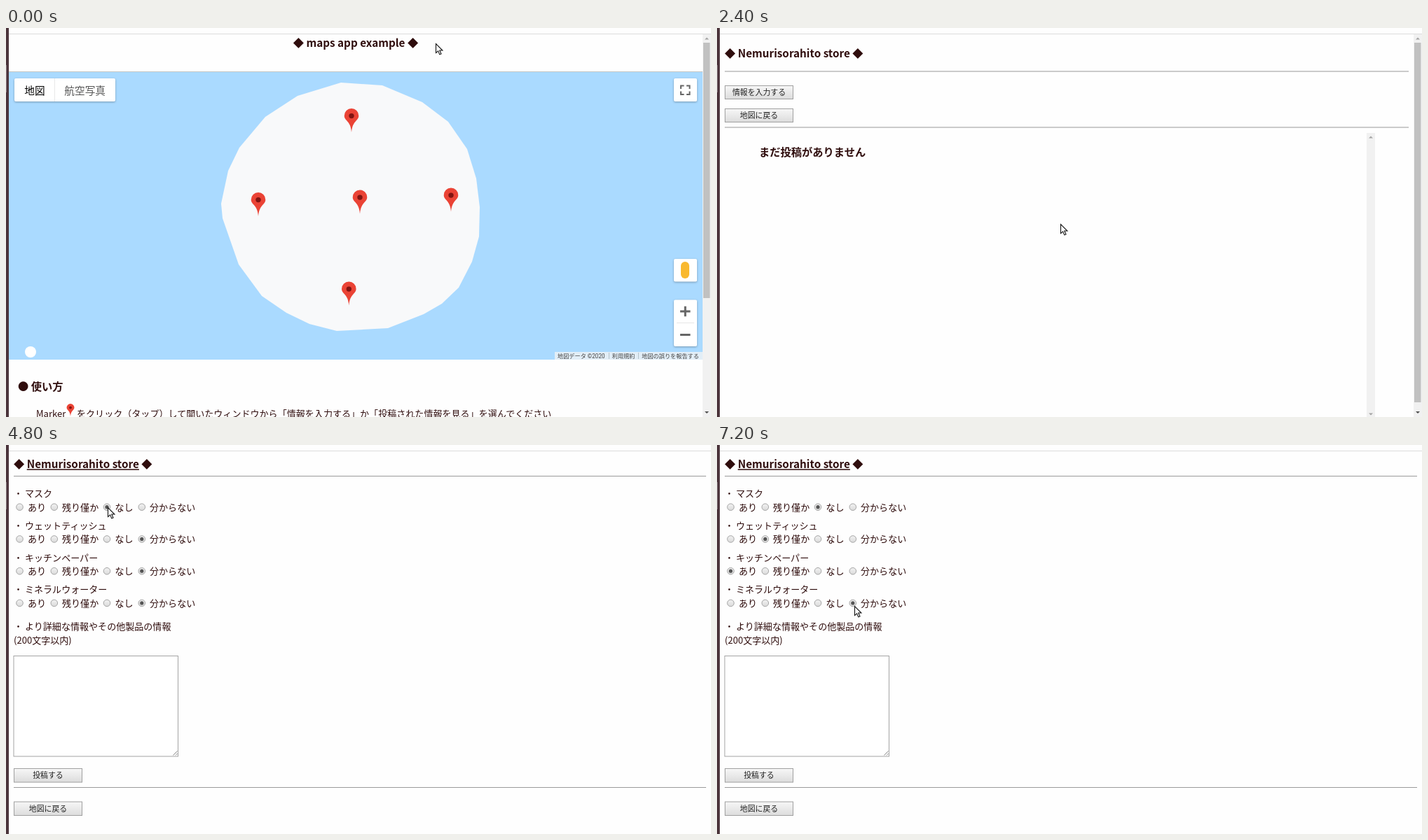
These frames come from a looping animation (1006 by 556 pixels, 8000 ms). An HTML page:

```html
<!DOCTYPE html>
<html lang="ja">
<head>
<meta charset="utf-8">
<title>maps app example</title>
<style>
  html, body { margin: 0; width: 100%; height: 100%; overflow: hidden; background: #fefefe; }
  svg { display: block; width: 1006px; height: 556px; }
  text { font: 13.05px "Noto Sans CJK JP", "Noto Sans CJK", sans-serif; fill: #2f0d0d; white-space: pre; }
  .h { font-size: 15.27px; font-weight: 700; }
  .u { text-decoration: underline; }
  .mid { text-anchor: middle; }
  .btn { font-size: 10.88px; fill: #222; }
  .arial { font-family: "Liberation Sans", Arial, sans-serif; }
  .ui { font-size: 14.68px; fill: #565656; }
  .on { font-weight: 500; fill: #000; }
  .info { font: 300 10.6px Roboto, "Noto Sans CJK JP", sans-serif; fill: #333; }
  .name { font-weight: 700; fill: #111; }
  .legal { font: 8.16px Roboto, "Noto Sans CJK JP", sans-serif; fill: #444; }
  .tip { font: 12px "Open Sans", "Noto Sans", sans-serif; fill: #fff; }
  .card { filter: drop-shadow(0 1px 1.5px rgba(0,0,0,.3)); }
  .pop { filter: drop-shadow(0 2px 4px rgba(0,0,0,.42)); }
</style>
</head>
<body>
<svg id="stage" viewBox="0 0 1006 556">
  <defs>
    <linearGradient id="face" x2="0" y2="1">
      <stop stop-color="#f7f7f7"/><stop offset="1" stop-color="#dcdcdc"/>
    </linearGradient>
    <linearGradient id="knob" x2="0" y2="1">
      <stop stop-color="#f2f2f2"/><stop offset="1" stop-color="#dadada"/>
    </linearGradient>
    <clipPath id="mapClip"><rect x="4" y="63" width="990" height="411"/></clipPath>
    <g id="pin">
      <path d="M0 0C-.8-9-3.2-12.5-6.4-16.2C-8.8-19-10.3-20.8-10.3-23.6A10.3 10.3 0 0 1 10.3-23.6C10.3-20.8 8.8-19 6.4-16.2C3.2-12.5.8-9 0 0Z" fill="#ea4335"/>
      <circle cy="-23.4" r="3.7" fill="#811411"/>
    </g>
    <path id="arrow" d="M.5.5V13.6L3.6 10.8L5.8 15.9L8 15L5.8 10H9.9Z" fill="#fff" stroke="#111" stroke-width="1.1"/>
    <path id="hand" d="M3 8V1.5Q4.2-.2 5.4 1.5V5.2L11 6.2Q12.5 6.7 12.3 8.4L11.5 12V14.5H4.5V12.5L.8 8.6Q.4 6.6 3 8Z" fill="#fff" stroke="#111" stroke-width="1.1"/>
  </defs>
</svg>
<script>
const stage = document.getElementById('stage');
const STORE = 'Nemurisorahito store';
const LOOP = 8000;

const rect = (x, y, w, h, fill, more = '') =>
  `<rect x="${x}" y="${y}" width="${w}" height="${h}" fill="${fill}" ${more}/>`;
const text = (x, y, s, cls = '') => `<text x="${x}" y="${y}" class="${cls}">${s}</text>`;
const path = (d, more) => `<path d="${d}" ${more}/>`;
const rule = (x1, x2, y, color = '#9a9a9a') => rect(x1, y, x2 - x1, 1, color);
const group = (id, body, more = '') => `<g id="${id}" ${more}>${body}</g>`;
const pin = (x, y, scale = 1) =>
  `<use href="#pin" transform="translate(${x} ${y}) scale(${scale})"/>`;
const triangle = (x, y, dir, fill) =>
  path(`M${x - 3} ${y + 1.5 * dir}h6l-3 ${-3 * dir}z`, `fill="${fill}"`);
const card = (x, y, w, h) => rect(x, y, w, h, '#fff', 'rx="2" class="card"');

function button(x, y, w, h, label, cls = '', edge = '#a0a0a0') {
  return rect(x + .5, y + .5, w - 1, h - 1, 'url(#face)', `stroke="${edge}"`) +
    text(x + w / 2, y + h / 2 + 4, label, 'btn mid ' + cls);
}

function scrollbar(id, bottom) {
  return group(id, rect(994, 9, 12, 547, '#f1f1f1') +
    rect(995, 21, 9.5, bottom - 21, '#c1c1c1') +
    triangle(1000, 15, 1, '#a3a3a3') + triangle(1000, 549.5, -1, '#505050'));
}

function mapPage() {
  const island = '478,78 537,82 594,106 631,134 658,173 671,215 676,256 675,298 665,334 646,371 ' +
    '622,394 596,409 545,429 472,433 433,423 400,407 365,383 332,338 309,272 307,251 317,204 ' +
    '333,171 370,127 416,97';
  const pins = [[493, 149], [360, 269], [505, 265.5], [635, 262.5], [489.3, 396.5]];
  const land = `<polygon points="${island}" fill="#f8f9fa"/>` + pins.map(p => pin(...p)).join('');
  const corners = 'M963 87v-4.5h4.5M971 82.500h4.500v4.500M975.500 90.500v4.500h-4.500M967.500 95h-4.500v-4.500';

  return text(499, 26.5, '◆ maps app example ◆', 'h mid') +
    rule(4, 994, 62, '#c4c6c4') +
    `<g clip-path="url(#mapClip)">${rect(4, 63, 990, 411, '#aadaff')}${group('land', land)}</g>` +
    card(12, 72, 144, 33) + rect(69, 72, 1, 33, '#e8e8e8') +
    text(26.3, 95, '地図', 'ui on') + text(83.3, 95, '航空写真', 'ui') +
    card(953, 72, 33, 33) + path(corners, 'fill="none" stroke="#666" stroke-width="2"') +
    card(953, 330, 33, 32.5) + rect(963, 334, 12, 24, '#f9b92f', 'rx="6"') +
    card(953, 388.500, 33, 66.500) + rect(957, 421, 25, 1, '#e6e6e6') +
    path('M962 405h14.500M969.250 397.750v14.500M962 438.500h14.500',
      'stroke="#666" stroke-width="3"') +
    '<circle cx="35" cy="463" r="8" fill="#fff"/>' +
    rect(783, 463, 211, 11, '#f5f5f5', 'opacity=".75"') +
    rect(860, 464, 1, 9, '#b5c3cc') + rect(902, 464, 1, 9, '#b5c3cc') +
    text(787, 471.8, '地図データ ©2020', 'legal') +
    text(864.800, 471.8, '利用規約', 'legal') + text(907.300, 471.8, '地図の誤りを報告する', 'legal') +
    text(17, 518, '● 使い方', 'h') +
    text(43, 556, 'Marker') + pin(92, 555, .53) +
    text(101, 556, 'をクリック（タップ）して開いたウィンドウから「情報を入力する」か「投稿された情報を見る」を選んでください');
}

function tooltip() {
  return rect(515.5, 260, 132.5, 20, '#2f2f2f', 'stroke="#fff" class="pop"') +
    text(521.5, 274, STORE, 'tip');
}

function popup() {
  const bubble = 'M416 113H595Q601 113 601 119V298Q601 304 595 304H514L505 313L496 304H416Q410 304 410 298V119Q410 113 416 113Z';
  const lines = ['LastUpdate: 2020年04月11日 17:37', 'Address: xxx xxx xxxx 0-00-0', 'Tel: 0000-00-0000'];
  return path(bubble, 'fill="#fff" class="pop"') +
    path('M590.500 117.500l6 6m0-6l-6 6', 'stroke="#555" stroke-width="1.100"') +
    text(420, 134, STORE, 'info name') + text(420, 149, '09:00 ~ 22:00', 'info') +
    rule(420, 586, 156.500) +
    lines.map((s, i) => text(420, 177 + 14.7 * i, s, 'info')).join('') +
    rule(420, 586, 214) +
    button(426, 227, 124, 26, 'Post', 'arial') +
    button(426, 263, 124, 26, 'View', 'arial', '#777');
}

function listPage() {
  return text(11, 42.3, `◆ ${STORE} ◆`, 'h') + rule(11, 987, 61.500) +
    button(11, 82, 98, 20, '情報を入力する') + button(11, 115, 98, 20, '地図に戻る') +
    rule(11, 987, 141.500) + text(60, 183, 'まだ投稿がありません', 'h') +
    rect(927, 150, 12, 406, '#f1f1f1') +
    triangle(933, 156, 1, '#a3a3a3') + triangle(933, 552, -1, '#a3a3a3');
}

const radioX = [19.5, 68.800, 144, 193.800];
const rowY = i => 88.700 + 45.75 * i;

function formPage() {
  const options = ['あり', '残り僅か', 'なし', '分からない'];
  const labelX = [31, 80, 155.5, 205];
  const goods = ['マスク', 'ウェットティッシュ', 'キッチンペーパー', 'ミネラルウォーター'];
  const rows = goods.map((name, i) => {
    const y = rowY(i);
    return text(11, y - 14.5, '・ ' + name) + options.map((s, k) =>
      `<circle cx="${radioX[k]}" cy="${y}" r="4.800" fill="url(#knob)" stroke="#a4a4a4"/>` +
      text(labelX[k], y + 5, s)).join('') +
      `<circle class="dot" cy="${y}" r="2.600" fill="#555"/>`;
  }).join('');

  return `<text x="11" y="33.300" class="h">◆ <tspan class="u">${STORE}</tspan> ◆</text>` +
    rule(11, 999, 44) + rows +
    text(11, 264, '・ より詳細な情報やその他製品の情報') + text(11, 284, '(200文字以内)') +
    rect(11, 301.5, 234.5, 143.5, '#fff', 'stroke="#a4a4a4"') +
    path('M238.500 443.500l6-6m-2.500 6l2.500-2.500', 'stroke="#777" stroke-width=".9"') +
    button(11, 462, 98, 20.5, '投稿する') + rule(11, 999, 489) +
    button(11, 509.500, 98, 20.5, '地図に戻る');
}

stage.insertAdjacentHTML('beforeend',
  rect(0, 0, 1006, 556, '#fefefe') +
  group('map', mapPage()) + group('tooltip', tooltip()) + group('popup', popup()) +
  group('list', listPage()) + group('form', formPage()) +
  scrollbar('longBar', 386) + scrollbar('shortBar', 535) +
  rect(4, 8, 1002, 1, '#dcdcdc') +
  rect(0, 0, 4, 556, '#4b343b') + rect(0, 53, 1, 39, '#85757b') +
  '<use id="cursor"/>');

const el = id => document.getElementById(id);
const layers = ['map', 'tooltip', 'popup', 'list', 'form', 'longBar', 'shortBar'];
const dots = [...document.querySelectorAll('.dot')];

// start time, visible layers, cursor position, chosen option per row
const steps = [
  [0, 'map longBar', 613, 22],
  [800, 'map longBar tooltip', 501, 243],
  [1600, 'map longBar popup', 508, 271],
  [2400, 'list shortBar', 490, 280],
  [3200, 'list shortBar', 66, 91],
  [4000, 'form', 632, 94, '3333'],
  [4800, 'form', 145, 89, '2333'],
  [5600, 'form', 71, 136, '2133'],
  [6400, 'form', 21, 181, '2103'],
  [7200, 'form', 196, 230, '2103']
];

let shown;
function show(step) {
  if (step === shown) return;
  shown = step;
  const [, names, x, y, picks = '3333'] = step;
  const visible = names.split(' ');
  for (const id of layers) el(id).style.display = visible.includes(id) ? '' : 'none';
  el('land').setAttribute('transform', `translate(0 ${visible.includes('popup') ? 82 : 0})`);
  el('cursor').setAttribute('href', visible.includes('tooltip') ? '#hand' : '#arrow');
  el('cursor').setAttribute('transform', `translate(${x} ${y})`);
  dots.forEach((dot, i) => dot.setAttribute('cx', radioX[picks[i]]));
}

const start = performance.now();
function tick() {
  const t = (performance.now() - start) % LOOP;
  show(steps.findLast(s => s[0] <= t));
  requestAnimationFrame(tick);
}
tick();
</script>
</body>
</html>
```
